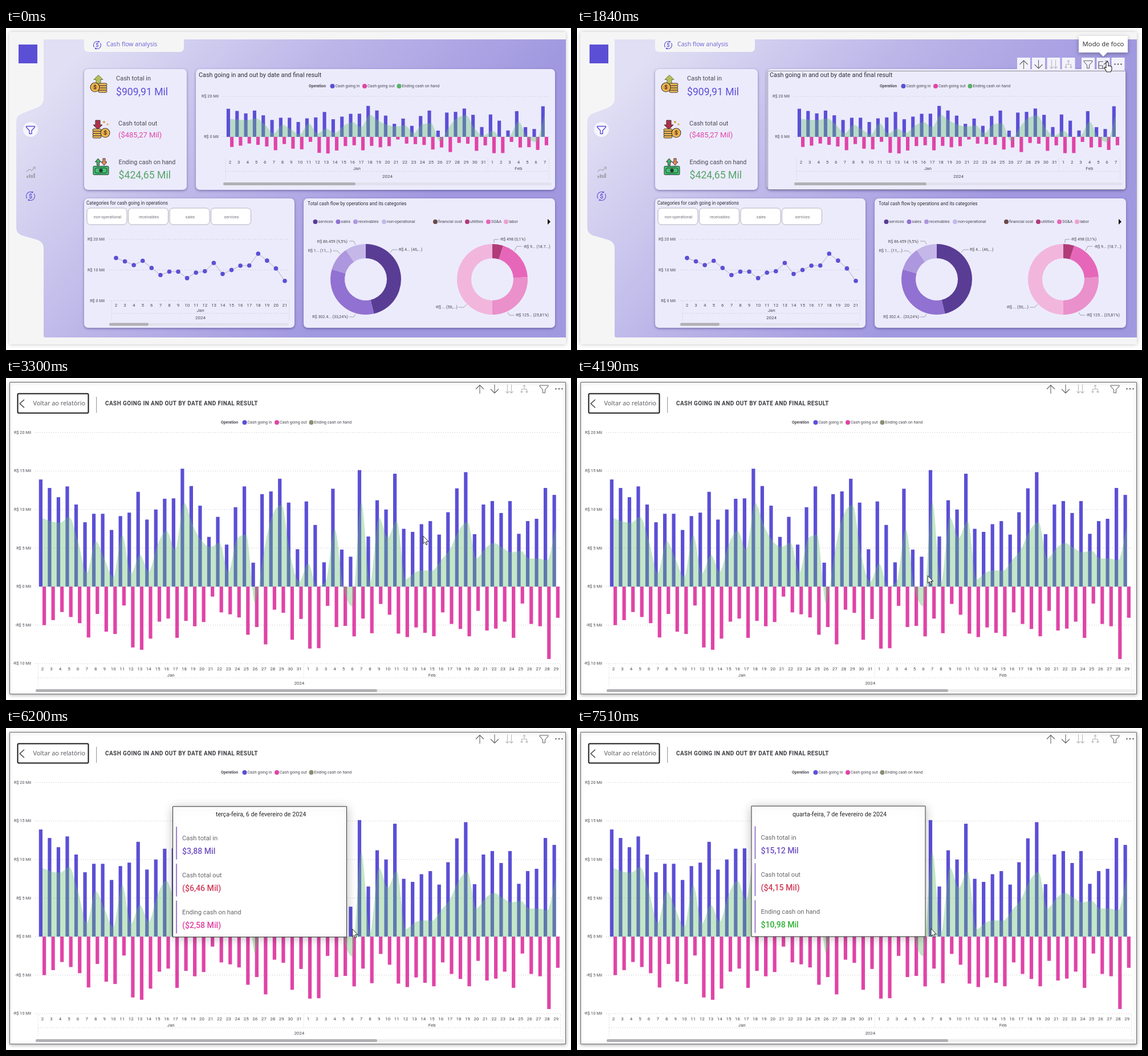
Animation, 991 px wide and 565 px high, one loop 8 s. Source, as an HTML page with a canvas:

```html
<!DOCTYPE html>
<html lang="en">
<head>
<meta charset="utf-8">
<title>Cash flow analysis</title>
<style>
html, body { margin: 0; width: 100%; height: 100%; overflow: hidden; background: #fff; }
canvas { display: block; }
</style>
</head>
<body>
<canvas id="stage" width="991" height="565"></canvas>
<script>
const c = document.getElementById('stage').getContext('2d');
const LOOP = 8000, BLUE = '#5b4fd6', PINK = '#e044a7', GREEN = '#5bb16a', INK = '#4a4952';
const SANS = 'Roboto, sans-serif', HUMAN = '"Open Sans", sans-serif';

// Daily amounts in Mil, 2 January to 29 February
const cashIn = [13.9, 12.8, 11.6, 13, 10.65, 8.35, 9.45, 9.45, 7.35, 9.15, 9.6, 12.3, 8.7, 10, 11.4, 11.45, 15.3, 13.05, 10.5, 6.45,
  9.05, 5.45, 10.3, 13, 3.1, 12, 12.35, 14, 10.9, 4.85, 11.05, 8, 3.15, 12.7, 4.8, 3.88, 15.12, 6.5, 11.2, 10,
  14.65, 7.5, 7.1, 8.1, 8.5, 6.75, 9.65, 12.75, 14.85, 6.8, 10.65, 11.1, 9.55, 11.1, 6.85, 8.5, 8.8, 12.8, 11.9];
const cashOut = [5, 4.35, 3.3, 3.95, 4.75, 6.6, 3.55, 5.85, 6.15, 2.45, 7.9, 8.2, 6.75, 4.55, 4.15, 6.65, 4.45, 5.15, 4.6, 1.3,
  3.35, 3.6, 4, 6.25, 5.25, 7.5, 3, 3.4, 6.9, 4.2, 8.05, 8, 2.5, 5.25, 5.1, 6.46, 4.15, 6.05, 2.25, 3.65,
  6.1, 6.55, 5.3, 6, 6.45, 3.35, 4.85, 5.5, 6.45, 3.15, 5.7, 5.45, 4.55, 6.65, 2.2, 4.85, 5.15, 9.4, 4.05];
const net = cashIn.map((v, i) => v - cashOut[i]);

function text(s, x, y, size, color = INK, align = 'left', weight = 400, family = SANS, spacing = 0) {
  c.font = `${weight} ${size}px ${family}`;
  c.letterSpacing = spacing + 'px';
  c.textAlign = align;
  c.textBaseline = 'middle';
  c.fillStyle = color;
  c.fillText(s, x, y);
}
function box(x, y, w, h, r, fill, stroke) {
  c.beginPath();
  c.roundRect(x, y, w, h, r);
  if (fill) { c.fillStyle = fill; c.fill(); }
  if (stroke) { c.strokeStyle = stroke; c.stroke(); }
}
function shadowed(color, blur, dy, draw) {
  c.save();
  c.shadowColor = color; c.shadowBlur = blur; c.shadowOffsetY = dy;
  draw();
  c.restore();
}
function dot(x, y, r, color) {
  c.beginPath(); c.arc(x, y, r, 0, 7); c.fillStyle = color; c.fill();
}
function icon(d, x, y, stroke, width = 1, fill) {
  const p = new Path2D(d);
  c.save();
  c.translate(x, y);
  c.lineJoin = 'round';
  if (fill) { c.fillStyle = fill; c.fill(p); }
  if (stroke) { c.strokeStyle = stroke; c.lineWidth = width; c.stroke(p); }
  c.restore();
}
function dotted(x1, y1, x2, y2) {
  c.save();
  c.setLineDash([1, 3]);
  c.strokeStyle = '#bdbbc3';
  c.beginPath(); c.moveTo(x1, y1); c.lineTo(x2, y2); c.stroke();
  c.restore();
}
function scrollbar(x, y, w, thumb, track) {
  box(x, y - 2.5, w, 5, 2.5, track);
  box(x, y - 2.5, thumb, 5, 2.5, '#b1b0b4');
}

function dateAxis(x0, step, n, y, row = 11) {
  const left = x0 - step / 2, right = left + n * step, feb = left + 30 * step;
  for (let i = 0; i < n; i++) text(i < 30 ? i + 2 : i - 29, x0 + i * step, y, 8, INK, 'center');
  const jan = Math.min(n, 30);
  text('Jan', left + jan * step / 2, y + row, 8, INK, 'center');
  if (n > 30) {
    text('Feb', (feb + right) / 2, y + row, 8, INK, 'center');
    dotted(feb, y - 7, feb, y + row + 5);
  }
  text('2024', (left + right) / 2, y + row * 2 + 3, 8, INK, 'center');
  dotted(left, y + row + 4.5, right, y + row + 4.5);
  dotted(left, y - 7, left, y + row * 2 + 8);
  dotted(right, y - 7, right, y + row * 2 + 8);
}
function valueAxis(ticks, zero, unit, labelX, x1, x2) {
  for (const v of ticks) {
    const y = zero - v * unit;
    dotted(x1, y, x2, y);
    text(`${v < 0 ? '-' : ''}R$ ${Math.abs(v)} Mil`, labelX, y, 7.2, INK, 'right');
  }
}
// Slope of a monotone cubic through the daily net values
function slope(i, n) {
  const a = net[i] - net[i - 1], b = net[i + 1] - net[i];
  if (i === 0) return b;
  if (i === n - 1) return a;
  return a * b <= 0 ? 0 : Math.sign(a) * Math.min(2 * Math.abs(a), 2 * Math.abs(b), Math.abs(a + b) / 2);
}
function comboChart(x0, step, n, zero, unit, ticks, axisY) {
  valueAxis(ticks, zero, unit, x0 - 20, x0 - 13, x0 + (n - .35) * step);
  const w = step * .4, Y = v => zero - v * unit;
  for (let i = 0; i < n; i++) {
    const x = x0 + i * step;
    c.fillStyle = BLUE; c.fillRect(x - w, Y(cashIn[i]), w, cashIn[i] * unit);
    c.fillStyle = PINK; c.fillRect(x, zero, w, cashOut[i] * unit);
  }
  c.beginPath();
  c.moveTo(x0, zero);
  c.lineTo(x0, Y(net[0]));
  for (let i = 1; i < n; i++) {
    const x = x0 + i * step;
    c.bezierCurveTo(x - step * 2 / 3, Y(net[i - 1] + slope(i - 1, n) / 3),
      x - step / 3, Y(net[i] - slope(i, n) / 3), x, Y(net[i]));
  }
  c.lineTo(x0 + (n - 1) * step, zero);
  c.fillStyle = 'rgba(100,190,110,.38)';
  c.fill();
  dateAxis(x0, step, n, axisY);
}
function operationLegend(x, y, endColor) {
  text('Operation', x, y, 6.8, INK, 'left', 700);
  [['Cash going in', 41.5, BLUE], ['Cash going out', 98, PINK], ['Ending cash on hand', 158.5, endColor]].forEach(([s, dx, color]) => {
    dot(x + dx, y, 4, color);
    text(s, x + dx + 5, y, 7.1);
  });
}

const ARROW_UP = 'M0 8V-7M-7 0L0-7L7 0', ARROW_DOWN = 'M0-8V7M-7 0L0 7L7 0';
const DOUBLE_DOWN = 'M-3.5-8V7M-6.5 4L-3.5 7L-.5 4M3.5-8V7M.5 4L3.5 7L6.5 4';
const FORK = 'M0-7V0M-4.5 6V0H4.5V6M-6.5 4L-4.5 6L-2.5 4M2.5 4L4.5 6L6.5 4M-2-5L0-7L2-5';
const FUNNEL = 'M-7.5-6.5H7.5V-5L2 1V6.5H-2V1L-7.5-5Z';
const FOCUS = 'M0-6H-8V6H8V1M-8 1H-1V6M1-1L8-7M3-7H8V-2';
function toolIcons(xs, y) {
  [ARROW_UP, ARROW_DOWN, DOUBLE_DOWN, FORK, FUNNEL].forEach((d, i) =>
    icon(d, xs[i], y, i === 2 || i === 3 ? '#b9b8bd' : '#66656b', 1.1));
  for (const dx of [-5.5, 0, 5.5]) dot(xs[5] + dx, y - .5, 1.2, '#55545a');
}
function moneyCycle(x, y, r, color) {
  c.strokeStyle = color;
  c.lineWidth = 1.1;
  for (const a of [-.6, 2.54]) {
    c.beginPath(); c.arc(x, y, r, a, a + 2.6); c.stroke();
    const e = a + 2.6, px = x + r * Math.cos(e), py = y + r * Math.sin(e);
    dot(px, py, 1.4, color);
  }
  c.lineWidth = 1;
  text('$', x, y + .5, r * 1.45, color, 'center', 500);
}
function coins(x, y, n) {
  for (let i = 0; i < n; i++) box(x, y - i * 4, 15, 4, 2, '#f2bd55', '#3b3330');
}
function bigCoin(x, y) {
  dot(x, y, 8.5, '#3b3330'); dot(x, y, 7.4, '#f2bd55'); dot(x, y, 5.2, '#e5a33d');
  text('$', x, y + .5, 9, '#3b3330', 'center', 700);
}
const BLOCK_UP = 'M0-8L8 0H4V8H-4V0H-8Z', BLOCK_DOWN = 'M0 8L8 0H4V-8H-4V0H-8Z';
const SMALL_UP = 'M0-6L5 0H2V6H-2V0H-5Z', SMALL_DOWN = 'M0 6L5 0H2V-6H-2V0H-5Z';
function kpis() {
  icon(BLOCK_UP, 162, 90.5, '#6d7440', 1, '#b4bf5c');
  coins(162, 109, 4); bigCoin(156, 104);
  text('Cash total in', 193, 89, 11);
  text('$909,91 Mil', 193, 112.5, 17.6, BLUE);

  icon(BLOCK_DOWN, 161, 170, '#3b3330', 1, '#b03048');
  dot(172, 165, 2, '#e5a33d'); dot(178, 169, 1.6, '#e5a33d');
  coins(152, 189, 4); bigCoin(174, 184);
  text('Cash total out', 197, 168, 11);
  text('($485,27 Mil)', 197, 188.5, 13, PINK);

  icon(SMALL_UP, 161.5, 235, '#3b3330', 1, '#43b96b');
  icon(SMALL_DOWN, 172, 235, '#3b3330', 1, '#ef8a5c');
  box(153, 242.5, 27, 15, 1.5, '#43c072', '#24382e');
  box(156, 245.5, 21, 9, 3, null, '#24382e');
  dot(166.5, 250, 3.2, '#24382e');
  text('Ending cash on hand', 197.5, 235.5, 10.8);
  text('$424,65 Mil', 197.5, 258.5, 17.7, '#55a468');
}

function donut(x, y, slices) {
  let start = -Math.PI / 2;
  for (const [share, color] of slices) {
    const end = start + share * 2 * Math.PI;
    c.beginPath();
    c.arc(x, y, 62, start, end);
    c.arc(x, y, 37, end, start, true);
    c.fillStyle = color;
    c.fill();
    start = end;
  }
}
function sidebar() {
  box(22, 29, 33, 33, 0, BLUE);
  dot(43, 178, 13, '#f6f5fc');
  icon(FUNNEL, 43, 179, BLUE, 1.4);
  c.fillStyle = '#a9a7b3';
  [4, 6, 5, 8].forEach((h, i) => c.fillRect(36 + i * 4, 263 - h, 3, h));
  icon('M-7 3L-2-1L2 1L8-5M4-5H8V-1', 43, 249, '#a9a7b3', 1.2);
  moneyCycle(43, 295, 7.5, BLUE);
}
function lineChart() {
  text('Categories for cash going in operations', 141, 308, 8.2, '#2f2e36');
  ['non-operational', 'receivables', 'sales', 'services'].forEach((s, i) => {
    const x = 142 + i * 72.5;
    box(x, 316, 70, 29, 6, '#fff', '#b3b1bd');
    text(s, x + 36, 331.5, 7, '#77757f', 'center');
  });
  valueAxis([20, 10, 0], 478.5, 5.39, 173, 181, 497);
  const pts = cashIn.slice(0, 20).map((v, i) => [193 + i * 15.58, 478.5 - v * 5.39]);
  c.beginPath();
  pts.forEach(p => c.lineTo(...p));
  c.strokeStyle = '#b0aebb';
  c.stroke();
  pts.forEach(p => dot(...p, 3.8, BLUE));
  dateAxis(193, 15.58, 20, 486.5, 9.5);
  scrollbar(181, 520, 315, 69, '#e3e1ee');
}
function donuts() {
  text('Total cash flow by operations and its categories', 529, 309, 8.2, '#2f2e36');
  const legend = [['services', 542.5, '#593c94'], ['sales', 582.5, '#9171d1'], ['receivables', 613, '#ad97de'], ['non-operational', 663, '#c5b8e8'],
    ['financial cost', 753, '#6b4a48'], ['utilities', 809, '#b03b78'], ['SG&A', 846, '#e667b9'], ['labor', 877, '#f0a0d3']];
  for (const [s, x, color] of legend) { dot(x, 340, 4, color); text(s, x + 5, 340, 7.1); }
  icon('M0-5L5 0L0 5Z', 950, 340, null, 1, '#111');
  donut(631, 441, [[.463, '#593c94'], [.3324, '#9171d1'], [.1096, '#ad97de'], [.095, '#c5b8e8']]);
  donut(853, 441, [[.05, '#b03b78'], [.19, '#e667b9'], [.26, '#ea90cb'], [.5, '#f2b6dd']]);
  icon('M602 374H610L613 380M573 391H581L586 396M687 389H678L674 394M602 507H610L613 502' +
    'M864 371H856V377M904 383H896L892 391M794 490H803L808 485M891 504H883L880 499', 0, 0, '#9a98a3', .9);
  const labels = [['R$ 86.459 (9,5%)', 599, 375, 1], ['R$ 1... (11,...)', 571, 391, 1], ['R$ 4... (46,...)', 689, 389],
    ['R$ 302.4... (33,24%)', 600, 507, 1], ['-R$ 498 (0,1%)', 866, 371], ['-R$ 9... (18.7...)', 907, 384],
    ['-R$ ... (50,...)', 792, 490, 1], ['-R$ 125... (25,81%)', 893, 504]];
  for (const [s, x, y, right] of labels) text(s, x, y, 7.1, INK, right ? 'right' : 'left');
}

function dashboard(t) {
  shadowed('rgba(0,0,0,.25)', 7, 0, () => box(6, 7, 976, 548, 0, '#f5f5f6'));
  const g = c.createLinearGradient(60, 120, 560, 560);
  g.addColorStop(0, '#e1dff4'); g.addColorStop(.5, '#bbb5e8'); g.addColorStop(.95, '#a199e0');
  icon('M66 20H982V543H69Q66 543 66 540V387Q66 376 56 372L28 364Q18 360 18 350V164Q18 154 28 150L54 140Q66 135 66 124Z', 0, 0, null, 1, g);
  sidebar();
  box(137, 7, 175, 35, [0, 0, 7, 7], '#f5f5f6');
  moneyCycle(160, 30, 6.5, BLUE);
  text('Cash flow analysis', 176, 29, 10.6, '#6a5fd4', 'left', 400, HUMAN);
  for (const [x, y, w, h] of [[137, 72, 180, 212], [333, 72, 630, 212], [137, 299, 369, 227], [522, 299, 441, 227]])
    shadowed('rgba(50,40,110,.5)', 4, 1.5, () => box(x, y, w, h, 7, '#ecebfc'));
  kpis();
  text('Cash going in and out by date and final result', 338, 83, 10.8, '#2f2e36');
  operationLegend(531, 102, GREEN);
  comboChart(393, 15.33, 37, 191, 3.55, [20, 0], 236);
  scrollbar(381, 273.5, 576, 232, '#e3e1ee');
  lineChart();
  donuts();
  if (t >= 1220) visualHeader(t);
}
function visualHeader(t) {
  box(334.5, 75.5, 628, 208, 2, null, '#8f8d99');
  const xs = [783.5, 809.5, 836, 862, 896.5, 949];
  for (const x of [...xs, 923]) box(x - 11.5, 52, 23, 21, 0, '#f3f2fc');
  toolIcons(xs, 64);
  icon(FOCUS, 923, 65, '#55545a', 1.2);
  if (t < 1840) return;
  shadowed('rgba(0,0,0,.3)', 7, 2, () => {
    icon('M880 14H966V43H930L923 50L916 43H880Z', 0, 0, null, 1, '#fff');
  });
  text('Modo de foco', 923, 29, 11.3, '#252429', 'center', 400, HUMAN);
}

function focusPage(t) {
  shadowed('rgba(0,0,0,.3)', 6, 1, () => box(6.5, 7.5, 975, 547, 0, '#fff', '#6a6a6a'));
  icon('M8-7L0 0L8 7', 24, 45, '#333', 1.3);
  text('Voltar ao relatório', 47.5, 45, 10.9, '#55545a', 'left', 400, HUMAN);
  if (t >= 2440) { c.lineWidth = 2; box(20.5, 27.5, 124, 34, 2, null, '#1a1a1a'); c.lineWidth = 1; }
  c.fillStyle = '#a5a5a5';
  c.fillRect(158, 33, 1.3, 28);
  text('CASH GOING IN AND OUT BY DATE AND FINAL RESULT', 174, 45.5, 10, '#3c3b40', 'left', 600, SANS, .4);
  toolIcons([831, 857, 883, 909, 943.5, 970], 19.5);
  operationLegend(377, 78, '#8a9074');
  if (t < 2310) comboChart(64, 15.33, 37, 167, 3.55, [20, 0], 212);
  else comboChart(64, 15.53, 59, 366, 13.52, [20, 15, 10, 5, 0, -5, -10], 510.5);
  scrollbar(52, 548.5, 926, 599, '#eeeeef');
}
function tooltip(x, y, alpha, day, amounts, endColor) {
  c.save();
  c.globalAlpha = alpha;
  shadowed('rgba(0,0,0,.25)', 16, 2, () => box(x + .5, y + .5, 305, 229, 0, '#fff', '#333'));
  text(day, x + 155, y + 15, 10.7, '#252429', 'center');
  ['Cash total in', 'Cash total out', 'Ending cash on hand'].forEach((s, i) => {
    const top = y + 36 + i * 64.8;
    c.fillStyle = '#9b7fd4';
    c.fillRect(x + 6, top, 2, 57.5);
    text(s, x + 17, top + 20.5, 11.2, '#66656b');
    text(amounts[i], x + 17, top + 43.5, 14.1, ['#7050c4', '#d03a58', endColor][i], 'left', 500);
  });
  c.restore();
}

// Pointer path: time, x, y
const path = [[550, 600, 515], [1290, 690, 285], [1760, 930, 60], [2770, 930, 60], [3300, 732, 277], [3640, 652, 346],
  [4330, 606, 347], [5990, 606, 347], [6810, 612, 369.5], [6950, 613, 371], [7290, 621, 352], [LOOP, 621, 352]];
function pointerAt(t) {
  const i = Math.max(1, path.findIndex(p => p[0] >= t));
  const [t0, x0, y0] = path[i - 1], [t1, x1, y1] = path[i], k = (t - t0) / (t1 - t0);
  return [x0 + (x1 - x0) * k, y0 + (y1 - y0) * k];
}
function pointer(t, x, y) {
  if (t >= 1720 && t < 2240)
    icon('M-2 1Q0-2 2 1V7Q4 5 5 7Q7 6 8 9V13L6 17H-1L-5 10Q-5 8-3 9L-2 10Z', x, y, '#222', 1.1, '#fff');
  else icon('M0 0V13.3L3 10.6L5.2 15.5L7.3 14.6L5.2 9.8H9.4Z', x, y, '#222', 1, '#fff');
}

function draw(t) {
  c.lineWidth = 1;
  c.fillStyle = '#fff';
  c.fillRect(0, 0, 991, 565);
  if (t < 2240) dashboard(t); else focusPage(t);
  if (t < 550) return;
  const [x, y] = pointerAt(t), fade = start => t < start + 70 ? .5 : 1;
  if (t >= 4730 && t < 7080)
    tooltip(x - 315.5, y - 215.5, fade(4730), 'terça-feira, 6 de fevereiro de 2024', ['$3,88 Mil', '($6,46 Mil)', '($2,58 Mil)'], '#e03fa0');
  if (t >= 7440)
    tooltip(x - 315.5, y - 215.5, fade(7440), 'quarta-feira, 7 de fevereiro de 2024', ['$15,12 Mil', '($4,15 Mil)', '$10,98 Mil'], '#2fae34');
  pointer(t, x, y);
}
const began = performance.now();
(function tick() {
  draw((performance.now() - began) % LOOP);
  requestAnimationFrame(tick);
})();
</script>
</body>
</html>
```
